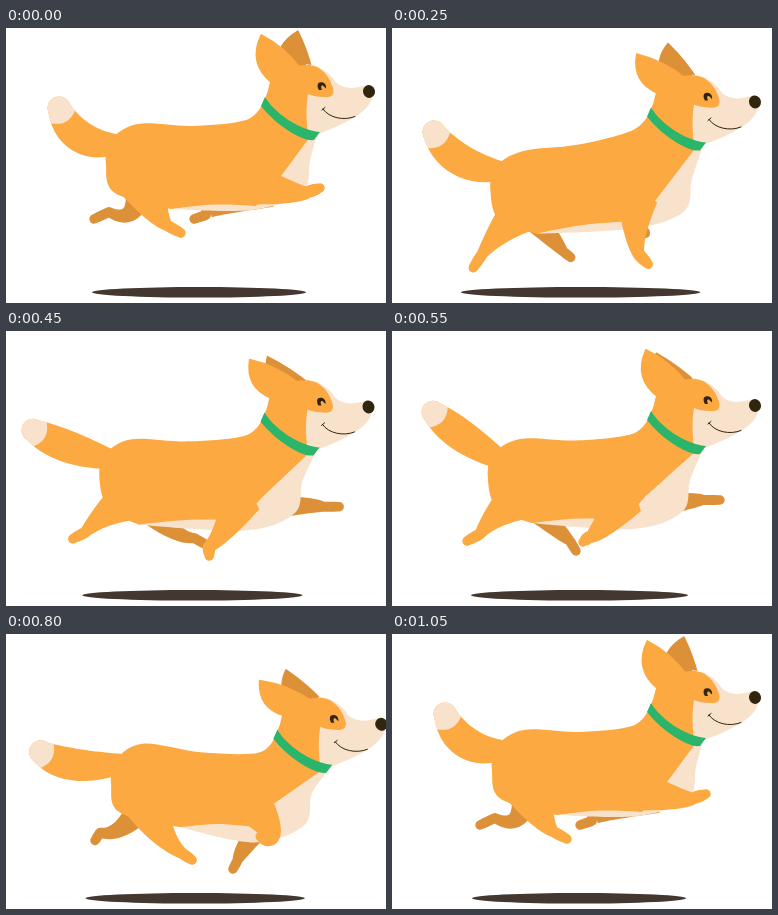
Recreate the animation shown at these times as an HTML page. Size 380 px wide and 275 px high, loop 1.1 s.

```html
<!DOCTYPE html>
<html lang="en">
<head>
<meta charset="utf-8">
<title>Running corgi</title>
<style>
  html, body { margin: 0; width: 100%; height: 100%; overflow: hidden; background: #fff; }
  svg { display: block; width: 380px; height: 275px; }
  .fur { fill: #fba940; }
  .shade { fill: #dc9139; }
  .cream { fill: #f8e2cb; }
  .dark { fill: #30250f; }
  .ear { stroke-width: 1.5; stroke-linejoin: round; }
  .ear.fur { stroke: #fba940; }
  .ear.shade { stroke: #dc9139; }
</style>
</head>
<body>
<svg viewBox="0 0 380 275">
  <ellipse id="shadow" cy="264.3" ry="5.3" fill="#433730"/>
  <path id="farRear" class="shade"/>
  <path id="farFront" class="shade"/>
  <path id="farEar" class="shade ear"/>
  <path id="tail" class="fur"/>
  <path id="tailTip" class="cream"/>
  <path id="chest" class="cream"/>
  <path id="body" class="fur"/>
  <path id="nearRear" class="fur"/>
  <path id="nearFront" class="fur"/>
  <g id="head">
    <path class="cream" d="M300 36C312 37 322 44 327 50C331 57 336 59 344 60C350 60 356 58 362 57L367 66C365 80 352 88 338 95C328 100 320 103 312 106L300 100Z"/>
    <path class="fur" d="M258 72C263 64 262 58 265 52C275 42 290 36 303 37C309 38 312 39 314 41C321 46 325 53 327 60C329 67 325 70 318 69C312 69 306 68 302 66C300 78 300 90 302 106L312 109C290 108 270 92 258 72Z"/>
    <path fill="#2bb56b" d="M259 69C268 84 292 102 314 104L308 112C296 114 270 97 255 78Z"/>
    <ellipse class="dark" cx="363" cy="63.5" rx="6" ry="6.5" transform="rotate(-20 363 63.5)"/>
    <path class="dark" d="M313 62C310 57 312 53 317 54.500C319.500 55.500 320.500 58 320 60.500L317 57.500C314.500 57 315 60 316 62Z"/>
    <path fill="none" stroke="#30250f" stroke-linecap="round" d="M316 82L319 79.500M317 81C323 90 338 93 349 88.500"/>
  </g>
  <path id="nearEar" class="fur ear"/>
</svg>
<script>
const LOOP = 1100, STEP = 50;

// Joints of the rig. tail: middle, tip; ears: near and far lean in degrees;
// legs: knee, ankle, toe; head: offset; shadow: left and right end.
const poses = [
  { t: 0, head: [0, 0], rump: [132, 96], groin: [165, 181], shoulder: [250, 157], keel: [296, 165],
    tail: [75, 109, 53, 80], ears: [31, -4], shadow: [86, 300],
    nearRear: [150, 183, 162, 198, 175, 205], farRear: [125, 184, 103, 184, 88, 191],
    nearFront: [285, 164, 302, 164, 314, 160], farFront: [215, 178, 200, 187, 188, 191] },
  { t: 150, head: [0, 5], rump: [136, 132], groin: [160, 211], shoulder: [250, 172], keel: [296, 180],
    tail: [83, 131, 68, 86], ears: [31, -4], shadow: [67, 316],
    nearRear: [120, 217, 107, 243, 101, 262], farRear: [156, 216, 149, 236, 146, 244],
    nearFront: [258, 203, 280, 219, 292, 224], farFront: [210, 200, 195, 213, 184, 215] },
  { t: 350, head: [0, 15], rump: [125, 111], groin: [130, 197], shoulder: [240, 171], keel: [288, 185],
    tail: [55, 129, 17, 118], ears: [61, 40], shadow: [73, 299],
    nearRear: [100, 187, 79, 206, 69, 213], farRear: [160, 200, 188, 207, 204, 211],
    nearFront: [230, 204, 215, 227, 221, 240], farFront: [285, 184, 310, 191, 322, 192] },
  { t: 550, head: [0, 11], rump: [128, 108], groin: [140, 192], shoulder: [233, 168], keel: [290, 181],
    tail: [69, 104, 41, 81], ears: [33, 37], shadow: [79, 296],
    nearRear: [105, 184, 88, 203, 75, 210], farRear: [163, 196, 178, 210, 184, 220],
    nearFront: [210, 196, 197, 206, 191, 211], farFront: [290, 171, 312, 169, 328, 169] },
  { t: 700, head: [11, 32], rump: [138, 116], groin: [168, 203], shoulder: [243, 182], keel: [297, 197],
    tail: [67, 133, 34, 119], ears: [36, 20], shadow: [78, 303],
    nearRear: [148, 212, 156, 238, 159, 248], farRear: [125, 203, 107, 217, 101, 226],
    nearFront: [238, 216, 210, 231, 192, 236], farFront: [263, 215, 264, 243, 271, 255] },
  { t: 900, head: [11.5, 18], rump: [135, 102], groin: [178, 182], shoulder: [252, 160], keel: [298, 183],
    tail: [70, 124, 37, 110], ears: [68, 40], shadow: [81, 294],
    nearRear: [160, 184, 190, 199, 203, 201], farRear: [112, 183, 89, 180, 85, 187],
    nearFront: [288, 175, 310, 178, 316, 166], farFront: [222, 197, 203, 202, 188, 206] }
];
poses.push({ ...poses[0], t: 1050, shadow: [80, 294] });

const RADII = { nearRear: [25, 13, 5.5], farRear: [16, 9, 5], nearFront: [20, 11, 6], farFront: [12, 9, 5] };
const TAIL_RADII = [10, 16, 11.5];

const count = poses.length;
const poseAt = i => poses[(i + count) % count];
const timeAt = i => poseAt(i).t + LOOP * Math.floor(i / count);

// Cyclic cubic blend of the neighbouring poses.
function poseFor(t) {
  let k = count - 1;
  while (poses[k].t > t) k--;
  const around = [-1, 0, 1, 2].map(n => k + n);
  const [ta, tb, tc, td] = around.map(timeAt);
  const span = tc - tb, u = (t - tb) / span, v = 1 - u, ease = 0.65 * span;
  const blend = (a, b, c, d) => (1 + 2 * u) * v * v * b + u * u * (3 - 2 * u) * c
    + u * v * ease * (v * (c - a) / (tc - ta) - u * (d - b) / (td - tb));
  const pose = {};
  for (const key of Object.keys(poses[0]).slice(1)) {
    const [a, b, c, d] = around.map(i => poseAt(i)[key]);
    pose[key] = b.map((x, i) => blend(a[i], x, c[i], d[i]));
  }
  return pose;
}

const add = ([x, y], dx, dy) => [x + dx, y + dy];
const mix = (a, b, u) => a.map((x, i) => x + (b[i] - x) * u);
const pairs = row => row.flatMap((x, i) => i % 2 ? [] : [[x, row[i + 1]]]);
const fmt = (...pts) => pts.map(([x, y]) => `${x.toFixed(2)} ${y.toFixed(2)}`).join(" ");
const setPath = (id, d) => document.getElementById(id).setAttribute("d", d);

// Closed smooth curve through the points, straight into the corners.
function blob(pts, corners) {
  const n = pts.length;
  const slope = pts.map((p, i) => corners.includes(i) ? [0, 0]
    : mix(pts[(i + n - 1) % n], pts[(i + 1) % n], 1).map((x, k) => (x - pts[(i + n - 1) % n][k]) / 6));
  return "M" + fmt(pts[0]) + pts.map((p, i) => {
    const j = (i + 1) % n, q = pts[j];
    return "C" + fmt(add(p, ...slope[i]), add(q, -slope[j][0], -slope[j][1]), q);
  }).join("") + "Z";
}

// Tapered band through three points with a round end.
function ribbon([a, b, c], [ra, rb, rc], from = 0) {
  const steps = 14;
  const through = (p, q, r, u) => (1 - u) * (1 - 2 * u) * p + 4 * u * (1 - u) * q + u * (2 * u - 1) * r;
  const centre = u => a.map((x, i) => through(x, b[i], c[i], u));
  const left = [], right = [];
  let start;
  for (let i = 0; i <= steps; i++) {
    const u = from + (1 - from) * i / steps;
    const p = centre(u), p0 = centre(u - 0.01), p1 = centre(u + 0.01);
    const len = Math.hypot(p1[0] - p0[0], p1[1] - p0[1]) || 1;
    const r = through(ra, rb, rc, u);
    const x = (p1[0] - p0[0]) / len * r, y = (p1[1] - p0[1]) / len * r;
    start = start || add(p, -0.8 * x, -0.8 * y);
    left.push(add(p, y, -x));
    right.unshift(add(p, -y, x));
  }
  return `M${fmt(...left)}A${rc} ${rc} 0 0 1 ${fmt(right[0])}L${fmt(...right)}Q${fmt(start, left[0])}Z`;
}

function leg(id, hip, joints) {
  const [knee, ankle, toe] = pairs(joints), radii = RADII[id], paw = radii[2];
  setPath(id, ribbon([hip, knee, ankle], radii)
    + ribbon([ankle, mix(ankle, toe, 0.5), toe], [paw, paw, 4.7]));
}

function ear(id, head, lean, length, root, front, back, bows) {
  const a = lean * Math.PI / 180;
  const tip = add(add(head, ...root), -length * Math.sin(a), -length * Math.cos(a));
  const bow = (p, q, k) => add(mix(p, q, 0.5), (p[1] - q[1]) * k, (q[0] - p[0]) * k);
  const f = add(head, ...front), b = add(head, ...back);
  setPath(id, `M${fmt(f)}Q${fmt(bow(f, tip, bows[0]), tip)}Q${fmt(bow(tip, b, bows[1]), b)}Z`);
}

function draw(t) {
  const { head, rump, groin, shoulder, keel, tail, ears, shadow, ...legs } = poseFor(t);
  const hind = add(rump, -32, 41), hip = add(rump, 3, 57);
  const nape = add(head, 240, 92), elbow = add(shoulder, 0, 21);

  setPath("body", blob([
    add(head, 257, 75), nape, add(mix(rump, nape, 0.5), 0, 4), rump,
    [mix(hind, rump, 0.15)[0], mix(rump, hind, 0.4)[1]], hind, add(hind, 9, 28),
    groin, add(mix(groin, elbow, 0.5), 0, -3), elbow,
    add(shoulder, 20, -2), add(head, 304, 109)
  ], [0, 7, 9, 10, 11]));
  setPath("chest", blob([
    add(head, 310, 110), add(keel, 8, -32), keel, add(keel, -50, 17),
    groin, add(shoulder, -30, 0), add(head, 285, 112)
  ], [0, 4, 5, 6]));

  const spine = [add(rump, -21, 20), ...pairs(tail)];
  setPath("tail", ribbon(spine, TAIL_RADII));
  setPath("tailTip", ribbon(spine, TAIL_RADII, 0.88));

  for (const id in legs)
    leg(id, id.endsWith("Rear") ? hip : id === "nearFront" ? shoulder : add(shoulder, 15, 10), legs[id]);

  ear("nearEar", head, ears[0], 48, [280, 48], [295, 41], [266, 55], [0.12, 0.4]);
  ear("farEar", head, ears[1], 41, [289, 44], [306, 42], [270, 42], [0.06, 0.3]);
  document.getElementById("head").setAttribute("transform", `translate(${head.join(" ")})`);

  const ellipse = document.getElementById("shadow");
  ellipse.setAttribute("cx", (shadow[0] + shadow[1]) / 2);
  ellipse.setAttribute("rx", (shadow[1] - shadow[0]) / 2);
}

const start = performance.now();
function tick() {
  const t = performance.now() - start;
  draw(Math.floor(t / STEP) * STEP % LOOP);
  requestAnimationFrame(tick);
}
tick();
</script>
</body>
</html>
```
